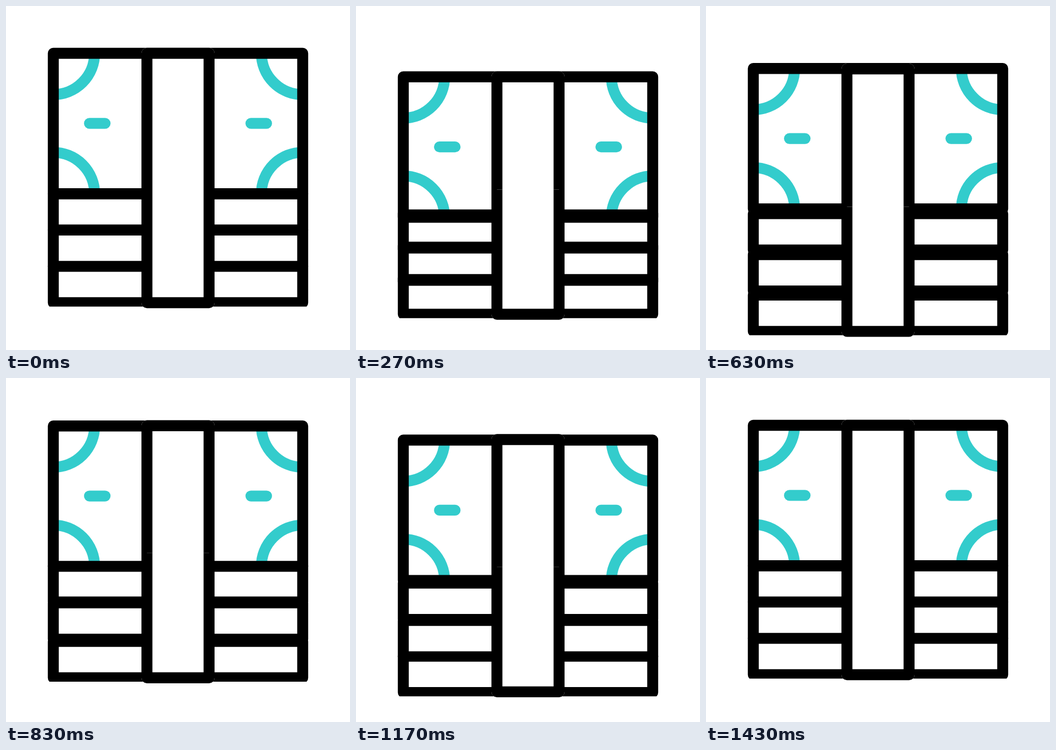
These frames come from a looping animation (640 by 640 pixels, 2000 ms). An HTML page without scripts:

```html
<!DOCTYPE html>
<html lang="en">
<head>
<meta charset="utf-8">
<title>Bouncing cash bundle</title>
<style>
  @property --t { syntax: "<number>"; inherits: true; initial-value: 0; }

  html, body { margin: 0; height: 100%; overflow: hidden; background: #fff; }

  svg {
    display: block;
    width: 100%;
    height: 100%;
    fill: none;
    stroke: #000;
    stroke-width: 20.4;
    stroke-linejoin: round;
    animation: clock 2s steps(60) -5ms infinite;
  }

  /* Clock in ticks of 1/30 s */
  @keyframes clock { from { --t: 0; } to { --t: 60; } }

  /* Two bounces: a deep dip and back, then a shallow one; each leg is a smoothstep */
  .bounce {
    --u: calc(var(--t) - var(--delay, 0));
    --land: 24;
    --hop: 34.3;
    --a: clamp(0, var(--u) / 13, 1);
    --b: clamp(0, (var(--u) - 13) / (var(--land) - 13), 1);
    --c: clamp(0, (var(--u) - var(--land)) / (33 - var(--land)), 1);
    --d: clamp(0, (var(--u) - 33) / 7, 1);
    --dip: calc(var(--a) * var(--a) * (3 - 2 * var(--a)) - var(--b) * var(--b) * (3 - 2 * var(--b)));
    --rebound: calc(var(--c) * var(--c) * (3 - 2 * var(--c)) - var(--d) * var(--d) * (3 - 2 * var(--d)));
    transform: translateY(calc(1px * (65.3 * var(--dip) + var(--hop) * var(--rebound))));
  }
  .late1 { --delay: 1; }
  .late2 { --delay: 2; }
  .late3 { --delay: 3; }
  .strap { --hop: 33; }
  .strap.top { --land: 24.2; }

  .teal { stroke: #3cc; }
</style>
</head>
<body>
<svg viewBox="0 0 640 640">
  <defs>
    <clipPath id="trim"><rect x="60" y="342" width="520" height="82"/></clipPath>
    <g id="band" clip-path="url(#trim)">
      <rect x="88" y="349.2" width="464" height="67.6"/>
    </g>
    <g id="ornament">
      <path d="M164.8 88A76.8 76.8 0 0 1 88 164.8M88 272.4A76.8 76.8 0 0 1 164.8 349.2"/>
      <path d="M155.3 218.4H184.3" stroke-linecap="round"/>
    </g>
    <g id="strap">
      <path class="bounce strap top" d="M262.2 360V88H377.8V360"/>
      <path class="bounce strap late3" d="M262.2 320V552H377.8V320"/>
    </g>
  </defs>

  <g class="bounce">
    <g class="teal">
      <use href="#ornament"/>
      <use href="#ornament" transform="translate(640) scale(-1 1)"/>
    </g>
    <rect x="88" y="88" width="464" height="261.2"/>
  </g>

  <g class="bounce late1"><use href="#band"/></g>
  <g class="bounce late2"><use href="#band" y="67.6"/></g>
  <g class="bounce late3"><use href="#band" y="135.2"/></g>

  <!-- The white copy leaves a hairline around the strap -->
  <use href="#strap" fill="#fff" stroke="#fff"/>
  <use href="#strap" fill="#fff"/>
</svg>
</body>
</html>
```
